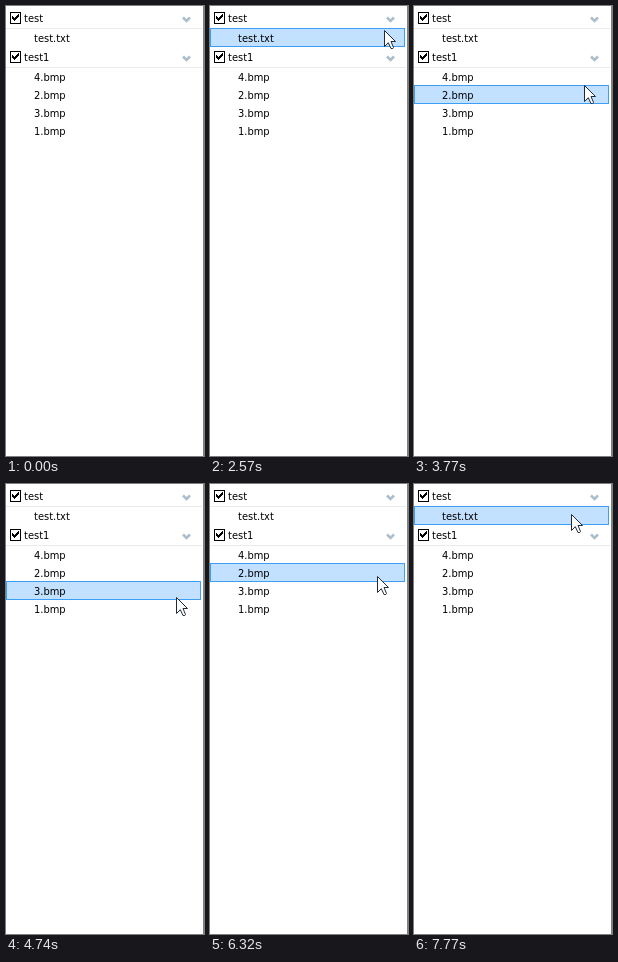
Recreate the animation shown at these times as an HTML page. Size 198x450 px, loop 8 s.

```html
<!DOCTYPE html>
<html lang="en">
<head>
<meta charset="utf-8">
<title>File list</title>
<style>
html, body { margin: 0; width: 100%; height: 100%; overflow: hidden; background: #fff; }
svg { display: block; }
text { font: 11px "DejaVu Sans Condensed", "Noto Sans", sans-serif; fill: #000; }
</style>
</head>
<body>
<svg width="198" height="450" viewBox="0 0 198 450">
  <defs>
    <linearGradient id="glow" x1="0" y1="0" x2="0" y2="1">
      <stop offset="0" stop-color="#ecf7fe"/>
      <stop offset=".3" stop-color="#e4f4fd"/>
      <stop offset=".3" stop-color="#d8effc"/>
      <stop offset="1" stop-color="#d5edfb"/>
    </linearGradient>
  </defs>
  <rect width="198" height="450" fill="#fff"/>
  <rect x="197" width="1" height="450" fill="#808080"/>
  <g id="list"></g>
  <path id="cursor" d="M.5 .5V16.5L4.3 12.7L7 18.5H8.8L9.5 17.5L7 11.5H11.5Z"
        fill="#fff" stroke="#222a38" stroke-linejoin="round"/>
</svg>
<script>
const LOOP = 8000, STEP = 120;
const HEADER = 20, ITEM = 18;

const groups = {
  test: ["test.txt"],
  test1: ["4.bmp", "2.bmp", "3.bmp", "1.bmp"]
};

// Straight pointer moves: start time, steps, end x, end y
const origin = { x: 13, y: 7 };
const moves = [
  [870, 10, 176, 10],
  [2450, 5, 170, 45],
  [3050, 13, 170, 108],
  [4740, 1, 170, 113],
  [4860, 2, 170, 130],
  [5350, 3, 169, 111],
  [5710, 1, 169, 108],
  [6080, 8, 163, 65],
  [7040, 2, 161, 55],
  [7410, 4, 157, 30]
].map(([start, steps, x, y]) => ({ start, steps, x, y }));

const list = document.getElementById("list");
const cursor = document.getElementById("cursor");

function add(tag, attrs, content = "") {
  const el = document.createElementNS("http://www.w3.org/2000/svg", tag);
  for (const key in attrs) el.setAttribute(key, attrs[key]);
  el.textContent = content;
  return list.appendChild(el);
}

function addCheckbox(x, y) {
  add("rect", { x: x + .5, y: y + .5, width: 10, height: 11, fill: "#fff", stroke: "#000" });
  let tick = "";
  for (let i = 0; i < 7; i++) {
    tick += `M${x + 2 + i} ${y + 6 - Math.abs(i - 2)}h1v3h-1z`;
  }
  add("path", { d: tick });
}

function addHeader(label, y) {
  const fill = add("rect", { y, width: 196, height: HEADER });
  const line = add("rect", { y: y + HEADER, width: 196, height: 1 });
  addCheckbox(4, y + 4);
  add("path", {
    d: `M177 ${y + 9.5}l3.5 3.5l3.5 -3.5`,
    fill: "none", stroke: "#abbecc", "stroke-width": 2.6
  });
  add("text", { x: 18, y: y + 14 }, label);
  return hot => {
    fill.setAttribute("fill", hot ? "url(#glow)" : "none");
    line.setAttribute("fill", hot ? "#92c4e2" : "#ebebeb");
  };
}

function addItem(label, y) {
  const box = add("rect", {
    x: .5, y: y + .5, width: 194, height: ITEM, fill: "#c2e0ff", stroke: "#3c9ff5"
  });
  add("text", { x: 28, y: y + 14 }, label);
  return hot => { box.style.display = hot ? "" : "none"; };
}

const rows = [];
let top_ = 2;
function addRow(build, label, height) {
  rows.push({ top: top_, end: top_ + height, highlight: build(label, top_) });
  top_ += height;
}
for (const name in groups) {
  addRow(addHeader, name, HEADER);
  groups[name].forEach(file => addRow(addItem, file, ITEM));
  top_ += 1;
}

function pointerAt(t) {
  let { x, y } = origin;
  for (const move of moves) {
    if (t < move.start) break;
    const k = Math.min(1, (Math.floor((t - move.start) / STEP) + 1) / move.steps);
    x += (move.x - x) * k;
    y += (move.y - y) * k;
  }
  return { x: Math.round(x), y: Math.round(y) };
}

function draw(t) {
  const visible = t >= moves[0].start;
  const { x, y } = pointerAt(t);
  cursor.style.display = visible ? "" : "none";
  cursor.setAttribute("transform", `translate(${x} ${y})`);
  for (const row of rows) row.highlight(visible && y >= row.top && y < row.end);
}

const began = performance.now();
function tick() {
  draw((performance.now() - began) % LOOP);
  requestAnimationFrame(tick);
}
tick();
</script>
</body>
</html>
```
